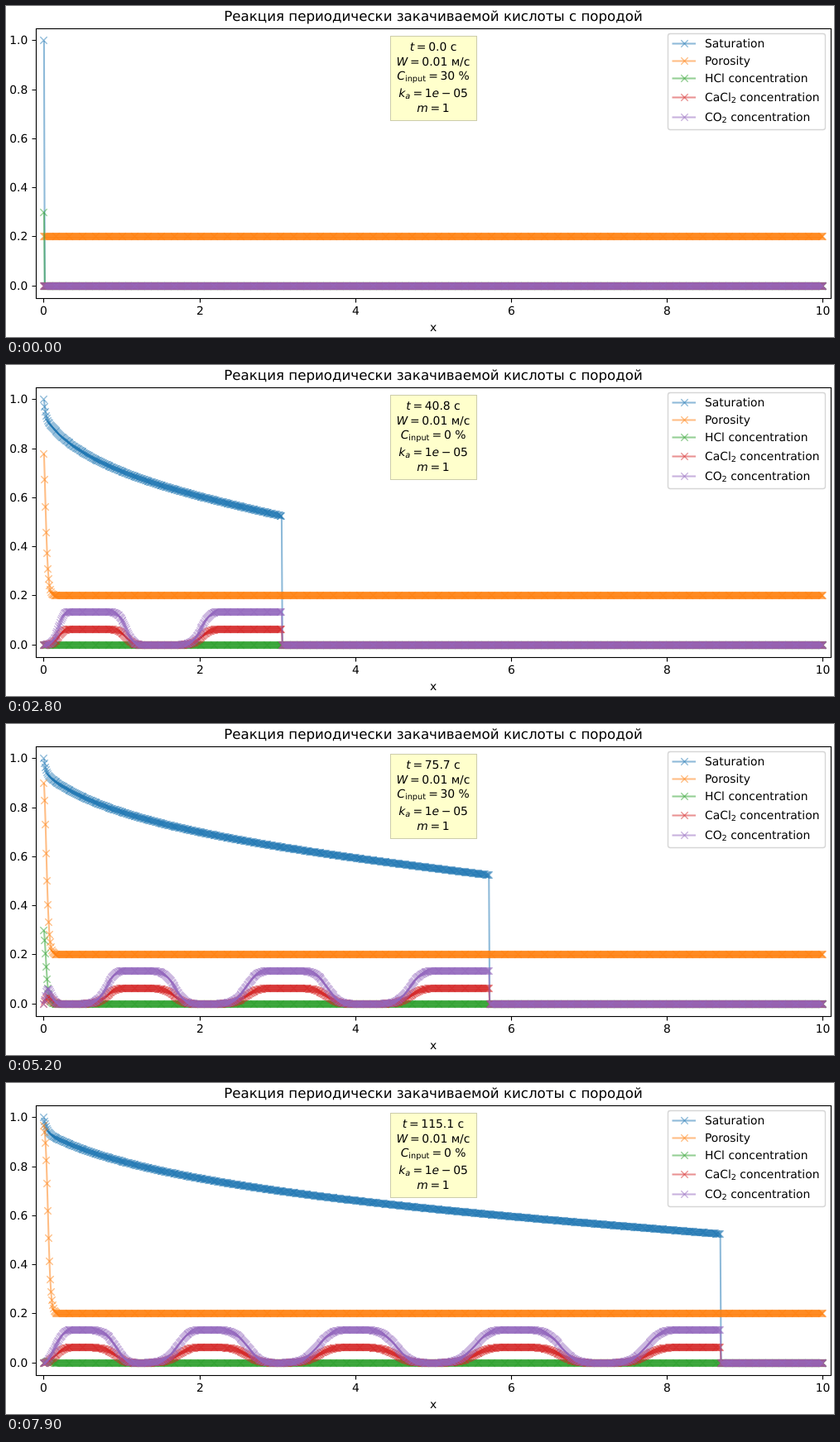
An HTML page with a canvas that plays this animation: 1000x400 px, repeating every 8 s.

```html
<!DOCTYPE html>
<html lang="ru">
<head>
<meta charset="utf-8">
<title>Реакция кислоты с породой</title>
<style>
  html, body { margin: 0; width: 100%; height: 100%; overflow: hidden; background: #fff; }
  canvas, svg { position: absolute; left: 0; top: 0; width: 1000px; height: 400px; }
  text { font: 13.89px "DejaVu Sans", sans-serif; fill: #000; white-space: pre; text-rendering: geometricPrecision; }
  .title { font-size: 16.67px; }
  .mid { text-anchor: middle; }
  .end { text-anchor: end; }
  .i { font-style: oblique; }
  .sub { font-size: 9.72px; }
</style>
</head>
<body>
<canvas id="plot" width="1000" height="400"></canvas>
<svg id="chart" viewBox="0 0 1000 400">
  <rect x="36.5" y="27.5" width="960" height="326" fill="none" stroke="#000" stroke-width="1.11"/>
  <text class="title mid" x="516" y="18">Реакция периодически закачиваемой кислоты с породой</text>
  <text class="mid" x="516" y="393">x</text>
  <g id="ticks"></g>
  <rect x="464.5" y="36.5" width="104" height="102" fill="#ffffcc" stroke="#ccccab" stroke-width="1"/>
  <text class="mid" x="516" y="54"><tspan class="i">t</tspan><tspan dx="2.7">=</tspan><tspan id="time" dx="2.7">0.0</tspan> с</text>
  <text class="mid" x="516" y="72"><tspan class="i">W</tspan><tspan dx="2.7">=</tspan><tspan dx="2.7">0.01</tspan> м/с</text>
  <text class="mid" x="516" y="89"><tspan class="i">C</tspan><tspan class="sub" dy="2.2">input</tspan><tspan dx="3.2" dy="-2.2">=</tspan><tspan id="input" dx="2.7">30</tspan> %</text>
  <text class="mid" x="516" y="110"><tspan class="i">k</tspan><tspan class="i sub" dy="2.2">a</tspan><tspan dx="3.2" dy="-2.2">=</tspan><tspan dx="2.7">1</tspan><tspan class="i">e</tspan><tspan dx="2.7">−</tspan><tspan dx="2.7">05</tspan></text>
  <text class="mid" x="516" y="128"><tspan class="i">m</tspan><tspan dx="2.7">=</tspan><tspan dx="2.7">1</tspan></text>
  <g id="legend">
    <rect x="799.5" y="33.5" width="190" height="116" rx="2.8" fill="#fff" fill-opacity=".8" stroke="#ccc" stroke-opacity=".8" stroke-width="1.39"/>
  </g>
</svg>
<script>
const FRAMES = 80, FRAME_MS = 100, FRAME_T = 1.4565;
const CELLS = 1000, DX = 10 / CELLS;
const FLUX = 0.01052, HALF_PERIOD = 12.12, ACID = 0.3;
const RATE = 0.176, ACID_USE = 5, SUBSTEPS = 14;
const MOBILITY = 0.361, POWER = 2.1;
const COLORS = ["#1f77b4", "#ff7f0e", "#2ca02c", "#d62728", "#9467bd"];

const $ = id => document.getElementById(id);
const px = x => 45.9 + 94.1 * x;
const py = v => 338.2 - 296.4 * v;
const injecting = t => Math.floor(t / HALF_PERIOD) % 2 === 0;

// Share of water in the flow at saturation s, and its slope
const waterShare = s => 1 / (1 + MOBILITY * Math.pow((1 - s) / s, POWER));
function shareSlope(s) {
  const f = waterShare(s);
  return POWER * f * (1 - f) / (s * (1 - s));
}

// Root of a falling function between the shock region and full saturation
function solve(fn) {
  let lo = 0.45, hi = 1;
  for (let i = 0; i < 40; i++) {
    const mid = (lo + hi) / 2;
    if (fn(mid) > 0) lo = mid; else hi = mid;
  }
  return lo;
}

const SHOCK = shareSlope(solve(s => shareSlope(s) - waterShare(s) / s));
const LEVELS = 600;
const profile = Float64Array.from({ length: LEVELS + 2 }, (_, i) =>
  solve(s => shareSlope(s) - SHOCK * i / LEVELS));

// Saturation at speed xi behind the shock, zero ahead of it
function saturationAt(xi) {
  if (xi > SHOCK) return 0;
  const p = xi / SHOCK * LEVELS, i = Math.floor(p);
  return profile[i] + (profile[i + 1] - profile[i]) * (p - i);
}

// Upwind transport of the acid and of a tracer marking all injected acid
function simulate() {
  const size = CELLS + 1;
  const sat = new Float64Array(size), por = new Float64Array(size).fill(0.2);
  const acid = new Float64Array(size), tracer = new Float64Array(size);
  const dt = FRAME_T / SUBSTEPS;
  const frames = [];
  let front = 0;

  function setState(t) {
    const on = injecting(t);
    sat[0] = 1;
    acid[0] = on ? ACID : 0;
    tracer[0] = on ? 1 : 0;
    let volume = 0;
    for (let i = 1; i < size && t > 0; i++) {
      volume += por[i - 1] * DX;
      sat[i] = saturationAt(volume / (FLUX * t));
      if (!sat[i]) break;
      if (i > front) {
        front = i;
        acid[i] = acid[i - 1];
        tracer[i] = tracer[i - 1];
      }
    }
  }

  function step() {
    for (let i = front; i > 0; i--) {
      const water = por[i] * sat[i];
      const share = FLUX * waterShare(sat[i]) / water * dt / DX;
      const grown = RATE * acid[i] * (1 - por[i]) * dt;
      tracer[i] += share * (tracer[i - 1] - tracer[i]);
      acid[i] += share * (acid[i - 1] - acid[i]) - ACID_USE * grown / water;
      acid[i] = Math.max(0, acid[i]);
      por[i] += grown;
    }
    por[0] += RATE * acid[0] * (1 - por[0]) * dt;
  }

  for (let n = 0; n < FRAMES; n++) {
    const t = n * FRAME_T;
    setState(t);
    const product = Float32Array.from(tracer, (v, i) => Math.max(0, v - acid[i] / ACID));
    frames.push([
      Float32Array.from(sat), Float32Array.from(por), Float32Array.from(acid),
      product.map(v => 0.063 * v), product.map(v => 0.135 * v)
    ]);
    for (let j = 0; j < SUBSTEPS; j++) {
      setState(t + j * dt);
      step();
    }
  }
  return frames;
}

function makeMarker(color) {
  const c = document.createElement("canvas");
  c.width = c.height = 11;
  const g = c.getContext("2d");
  g.globalAlpha = 0.5;
  g.strokeStyle = color;
  g.lineWidth = 1.39;
  g.moveTo(1.33, 1.33); g.lineTo(9.67, 9.67);
  g.moveTo(1.33, 9.67); g.lineTo(9.67, 1.33);
  g.stroke();
  return c;
}

function addSvg(parent, markup) {
  parent.insertAdjacentHTML("beforeend", markup);
}

function buildAxes() {
  for (let i = 0; i <= 5; i++) {
    const x = Math.floor(px(2 * i)) + 0.5, y = Math.floor(py(0.2 * i)) + 0.5;
    addSvg($("ticks"), `<path d="M${x} 353.5v5M36.5 ${y}h-5" stroke="#000" stroke-width="1.11"/>
      <text class="mid" x="${x}" y="373">${2 * i}</text>
      <text class="end" x="26.3" y="${y + 4.5}">${(0.2 * i).toFixed(1)}</text>`);
  }
}

function buildLegend() {
  const sub = '<tspan class="sub" dy="2.2">2</tspan><tspan dy="-2.2"> concentration</tspan>';
  const rows = [[45, "Saturation"], [66, "Porosity"], [87, "HCl concentration"],
    [110, "CaCl" + sub], [134, "CO" + sub]];
  rows.forEach(([y, label], i) => addSvg($("legend"),
    `<g stroke="${COLORS[i]}" fill="none" stroke-opacity=".5">
      <path d="M804.5 ${y + 0.5}h28.5" stroke-width="2.08"/>
      <path d="M815.3 ${y - 3.7}l8.4 8.4m-8.4 0l8.4 -8.4" stroke-width="1.39"/>
    </g><text x="844" y="${y + 5}">${label}</text>`));
}

buildAxes();
buildLegend();
const ctx = $("plot").getContext("2d");
const markers = COLORS.map(makeMarker);
const frames = simulate();

function drawSeries(values, s) {
  ctx.globalAlpha = 0.5;
  ctx.strokeStyle = COLORS[s];
  ctx.lineWidth = 2.08;
  ctx.lineJoin = "round";
  ctx.beginPath();
  values.forEach((v, i) => ctx.lineTo(px(i * DX), py(v)));
  ctx.stroke();
  ctx.globalAlpha = 1;
  values.forEach((v, i) =>
    ctx.drawImage(markers[s], Math.floor(px(i * DX)) - 5, Math.floor(py(v)) - 5));
}

let shown = -1;
function tick() {
  const n = Math.floor(performance.now() / FRAME_MS) % FRAMES;
  if (n !== shown) {
    shown = n;
    ctx.clearRect(0, 0, 1000, 400);
    frames[n].forEach(drawSeries);
    const t = n * FRAME_T;
    $("time").textContent = t.toFixed(1);
    $("input").textContent = injecting(t) ? "30" : "0";
  }
  requestAnimationFrame(tick);
}
tick();
</script>
</body>
</html>
```
